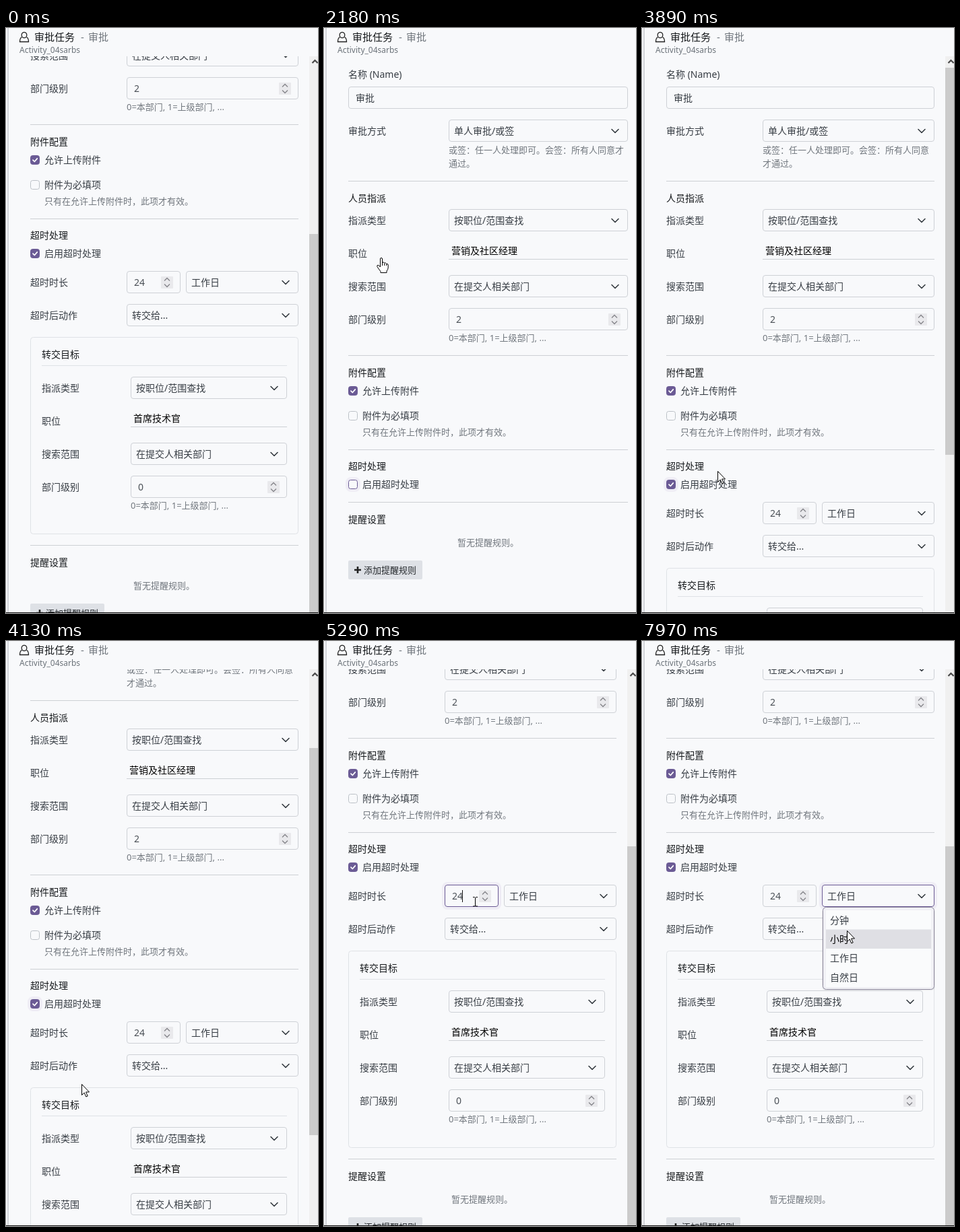
These frames come from a looping animation (463x869 px, 8 s). An HTML page:

```html
<!DOCTYPE html>
<html lang="zh-CN">
<head>
<meta charset="utf-8">
<title>审批任务</title>
<style>
html, body { margin: 0; width: 100%; height: 100%; overflow: hidden; background: #f8f9fb; }
svg { display: block; font: 14px "Noto Sans", "Noto Sans CJK SC", "Noto Sans CJK JP", sans-serif; }
text { fill: #373d44; white-space: pre; }
.head { fill: #15181b; font-weight: 500; }
.value { fill: #000; font-weight: 500; }
.hint { fill: #70767d; font-size: 13px; }
.muted { fill: #70767d; }
.number { fill: #4b5157; }
.on { fill: #000; }
.box { fill: #f8f9fb; stroke: #ced1d6; }
.box.hover { stroke: #a39bc2; }
.box.focus { stroke: #6b5b95; }
.rule { stroke: #cdd0d4; }
.soft { stroke: #dfe2e6; fill: none; }
.chev { fill: none; stroke: #343a40; stroke-width: 1.6; stroke-linecap: round; stroke-linejoin: round; }
.spin { fill: none; stroke: #85858a; stroke-width: 1.3; }
.ring { fill: none; stroke: #efedf5; stroke-width: 4; }
.pointer { fill: #fff; stroke: #000; stroke-width: 1; stroke-linejoin: round; }
</style>
</head>
<body>
<svg id="stage" width="463" height="869" viewBox="0 0 463 869"></svg>
<script>
const LOOP = 8000;
const HIDE = 2140, SHOW = 3570, FOCUS = 5130, OPEN = 7650;
const $ = id => document.getElementById(id);

// Drawing helpers; y is the middle of the row
const text = (x, y, s, cls = '') => `<text x="${x}" y="${y + 5}" class="${cls}">${s}</text>`;
const rule = (x, r, y, cls = 'rule') => `<path d="M${x} ${y}H${r}" class="${cls}"/>`;
const box = (x, r, y, id = '') =>
  `<rect id="${id}" class="box" x="${x + .5}" y="${y - 16.5}" width="${r - x - 1}" height="32" rx="3.5"/>`;
const select = (x, r, y, s, id) => box(x, r, y, id) + text(x + 8, y, s) +
  `<path class="chev" d="M${r - 24} ${y - 2.5}l5 5 5-5"/>`;
const number = (x, r, y, s, id) => box(x, r, y, id) + text(x + 11, y, s, 'number') +
  `<rect x="${r - 29}" y="${y - 9}" width="18" height="18" rx="1" fill="#e9e9ec"/>
   <path class="spin" d="M${r - 24} ${y - 2.5}l4-4 4 4m-8 5l4 4 4-4"/>`;
const check = (y, s, on, edge = on ? '#6b5b95' : '#bcc1c7') =>
  `<rect x="36.5" y="${y - 6.5}" width="13" height="13" rx="3" fill="${on ? '#6b5b95' : '#f8f9fb'}" stroke="${edge}"/>` +
  (on ? `<path d="M40 ${y + .2}l2.3 2.3 4-4.6" fill="none" stroke="#fff" stroke-width="1.7" stroke-linecap="round" stroke-linejoin="round"/>` : '') +
  text(57, y, s);
const ring = (x, y, w, h, id) =>
  `<rect id="${id}" class="ring" x="${x}" y="${y}" width="${w}" height="${h}" rx="6"/>`;

const LEVELS = '0=本部门, 1=上级部门, ...';

// Assignment rows, shared by the form and the transfer panel
function assign(y, label, x, r, job, level, id) {
  return text(label, y, '指派类型') + select(x, r, y, '按职位/范围查找', id) +
    text(label, y + 49, '职位') + text(x + 4, y + 45, job, 'value') + rule(x, r, y + 57.5) +
    text(label, y + 98, '搜索范围') + select(x, r, y + 98, '在提交人相关部门') +
    text(label, y + 147, '部门级别') + number(x, r, y + 147, level) +
    text(x, y + 174, LEVELS, 'hint');
}

function reminders(y, r, x) {
  return rule(36, r, y + .5) + text(36, y + 26, '提醒设置', 'head') +
    text(x, y + 60, '暂无提醒规则。', 'hint') +
    `<rect x="36" y="${y + 87}" width="110" height="28" rx="2" fill="#dee1e6"/>
     <path d="M45 ${y + 101}h10m-5-5v10" stroke="#222" stroke-width="2.6"/>
     <text x="59" y="${y + 106}" style="font-size:13px;fill:#25292d">添加提醒规则</text>`;
}

function form(open) {
  const x = open ? 179 : 185, r = open ? 434 : 451;
  const note = open ? ['所有人同意', '才通过。'] : ['所有人同意才', '通过。'];
  let s = text(36, 69, '名称 (Name)') + box(36, r, 104) + text(47, 104, '审批') +
    text(36, 153, '审批方式') + select(x, r, 153, '单人审批/或签') +
    text(x, 181, '或签：任一人处理即可。会签：' + note[0], 'hint') + text(x, 201, note[1], 'hint') +
    rule(36, r, 227.5) + text(36, 253, '人员指派', 'head') +
    assign(286, 36, x, r, '营销及社区经理', 2) +
    rule(36, r, 486.5) + text(36, 512, '附件配置', 'head') +
    check(539, '允许上传附件', true) + check(576, '附件为必填项', false) +
    text(57, 600, '只有在允许上传附件时，此项才有效。', 'hint') +
    rule(36, r, 626.5) + text(36, 651, '超时处理', 'head') +
    ring(34, 669, 18, 18, open ? 'checkRing' : '') + check(678, '启用超时处理', open, '#6b5b95');
  if (!open) return s + reminders(704, r, 198);
  return s + text(36, 721, '超时时长') + ring(177, 702, 84, 37, 'inputRing') + ring(265, 702, 171, 37, 'unitRing') +
    number(179, 259, 721, 24, 'hours') + select(267, r, 721, '工作日', 'unit') +
    '<path id="caret" d="M205.5 712v18" stroke="#111"/>' +
    text(36, 770, '超时后动作') + select(x, r, 770, '转交给...', 'action') +
    '<rect class="soft" x="36.5" y="802.5" width="397" height="292" rx="4"/>' +
    text(53, 828, '转交目标', 'head') + rule(53, 417, 844.5, 'soft') +
    assign(878, 53, 185, 417, '首席技术官', 0, 'target') +
    reminders(1111, r, 189);
}

const menu = `<g id="menu">
  <rect x="267" y="396" width="168" height="123" rx="6" fill="#000" opacity=".08"/>
  <rect x="268.5" y="395.5" width="165" height="122" rx="5" fill="#f1f1f5" stroke="#8f8a9f"/>
  <rect x="273" y="400" width="156" height="114" fill="#fafbfc"/>
  <rect id="mark" x="273" width="156" height="28.5" fill="#dfdfe4"/>
  <g id="options">${['分钟', '小时', '工作日', '自然日'].map((s, i) => text(279, 415 + Math.floor(28.4 * i), s)).join('')}</g>
</g>`;

const pointers = `<g id="pointer">
  <path id="arrow" class="pointer" d="M.5.5V16.5L4.2 13l2.6 6 2.4-1L6.6 12H11.5Z"/>
  <path id="hand" class="pointer" d="M-1.5 14V2Q-1.5.5 0 .5T1.5 2V8Q1.8 6.8 3.2 7T4.7 8.5Q5.2 7.5 6.4 8T7.7 9.5Q10.2 8.8 10.2 11V15Q10 18 8 20V22.5H-1V20.5Q-4 17-6 13.5Q-6.8 11.5-5 11.2Q-3.5 11.3-1.5 14ZM1.5 8V12M4.7 9V12M7.7 10V12"/>
  <path id="beam" d="M-3-6.5h2.5l1 1 1-1H4M.5-6V6.5M-3 7h2.5l1-1 1 1H4" fill="none" stroke="#000"/>
</g>`;

$('stage').innerHTML = `
  <defs><clipPath id="view"><rect y="42" width="463" height="826"/></clipPath></defs>
  <rect width="463" height="869" fill="#f8f9fb"/>
  <g clip-path="url(#view)">
    <g id="closed">${form(false)}</g>
    <g id="opened">${form(true)}</g>
    <g id="bar">
      <rect x="450" y="42" width="13" height="827" fill="#f0f0f0"/>
      <rect id="thumb" x="450" width="13" height="575" fill="#cbcbcb"/>
      <path d="M454.5 52l4-4 4 4" fill="none" stroke="#484848" stroke-width="2.2"/>
    </g>
  </g>
  <path d="M3 0V868" stroke="#d2d4d8" stroke-width="2"/>
  <path d="M23.5 13.5Q20.5 15 20.5 20.5H33.5Q33.5 15 30.5 13.5" fill="none" stroke="#222" stroke-width="1.3"/>
  <ellipse cx="27" cy="10.5" rx="3.8" ry="4.2" fill="#f8f9fb" stroke="#222" stroke-width="1.3"/>
  <g style="font-size:15px">${text(42, 14, '审批任务', 'head') + text(111, 14, '-', 'muted') + text(122, 14, '审批', 'muted')}</g>
  <text x="20" y="37" style="font-size:12px;fill:#6c737a">Activity_04sarbs</text>
  ${menu}${pointers}
  <rect y="868" width="463" height="1" fill="#161616"/>`;

// time, x, y, shape
const path = [
  [660, 312, 580, 'beam'], [740, 314, 550, 'hand'], [860, 317, 517, 'arrow'], [1020, 322, 470, 'arrow'],
  [1180, 322, 470, 'arrow'], [1260, 323, 464, 'arrow'], [1460, 323, 464, 'arrow'], [1660, 178, 456, 'arrow'],
  [1820, 108, 385, 'arrow'], [1940, 86, 343, 'hand'], [1980, 85, 341, 'hand'],
  [2510, 85, 341, 'arrow'], [2670, 80, 506, 'beam'], [2710, 80, 515, 'beam'],
  [3000, 80, 515, 'beam'], [3040, 80, 526, 'arrow'], [3200, 82, 668, 'hand'], [3320, 83, 687, 'hand'],
  [3650, 83, 687, 'arrow'], [3850, 112, 658, 'arrow'], [4210, 112, 658, 'arrow'], [4370, 120, 572, 'arrow'],
  [4410, 120, 572, 'arrow'], [4610, 195, 443, 'hand'], [4730, 215, 411, 'arrow'], [4770, 219, 394, 'beam'],
  [4850, 224, 386, 'beam'], [5130, 224, 386, 'beam'], [5210, 224, 387, 'beam'],
  [5530, 224, 387, 'beam'], [5610, 230, 384, 'arrow'], [5730, 237, 382, 'arrow'],
  [5980, 237, 382, 'arrow'], [6040, 218, 381, 'beam'], [6930, 218, 381, 'beam'], [6990, 232, 380, 'arrow'],
  [7050, 245, 379, 'arrow'], [7210, 245, 379, 'arrow'], [7330, 268, 379, 'hand'], [7400, 285, 378, 'hand'],
  [7850, 285, 378, 'arrow'], [7960, 304, 430, 'arrow']
];
const scrolling = [[3930, 0], [4050, 50], [4130, 138], [4210, 230], [4290, 305], [4370, 342]];

function at(keys, t) {
  const i = keys.findIndex(k => k[0] > t);
  if (i < 0) return keys[keys.length - 1];
  if (!i) return keys[0];
  const a = keys[i - 1], b = keys[i], p = (t - a[0]) / (b[0] - a[0]);
  return a.map((v, n) => typeof v === 'number' ? Math.round(v + (b[n] - v) * p) : v);
}
const show = (id, on) => { $(id).style.display = on ? '' : 'none'; };
const selects = ['unit', 'action', 'target'].map($);
const options = [...$('options').children];

function render(t) {
  const closed = t >= HIDE && t < SHOW, open = t >= OPEN;
  const focused = t >= FOCUS && !open;
  const scroll = t < HIDE ? 343 : at(scrolling, t)[1];
  const [, x, y, shape] = at(path, t);

  show('closed', closed);
  show('opened', !closed);
  show('bar', !closed);
  $('opened').setAttribute('transform', `translate(0 ${-scroll})`);
  $('thumb').setAttribute('y', Math.round(59 + .72 * scroll));

  show('checkRing', t >= SHOW && t < FOCUS);
  show('inputRing', focused);
  show('unitRing', open);
  show('caret', focused && (t < 5730 || t >= 6350 && t < 7210));
  $('hours').classList.toggle('focus', focused);
  for (const el of selects) {
    const dx = x - el.x.baseVal.value, dy = y + scroll - el.y.baseVal.value;
    const inside = dx >= 0 && dx <= el.width.baseVal.value && dy >= 0 && dy <= 32;
    el.classList.toggle('hover', inside && t >= 660 && !open);
  }
  $('unit').classList.toggle('focus', open);

  show('menu', open);
  const row = y < 400 ? 2 : y < 429 ? 0 : 1;
  $('mark').setAttribute('y', 400 + 28.5 * row);
  options.forEach((el, i) => el.classList.toggle('on', i === row));

  show('pointer', t >= 660);
  $('pointer').setAttribute('transform', `translate(${x} ${y})`);
  for (const id of ['arrow', 'hand', 'beam']) show(id, id === shape);
}

const start = performance.now();
function tick() {
  render((performance.now() - start) % LOOP);
  requestAnimationFrame(tick);
}
tick();
</script>
</body>
</html>
```
